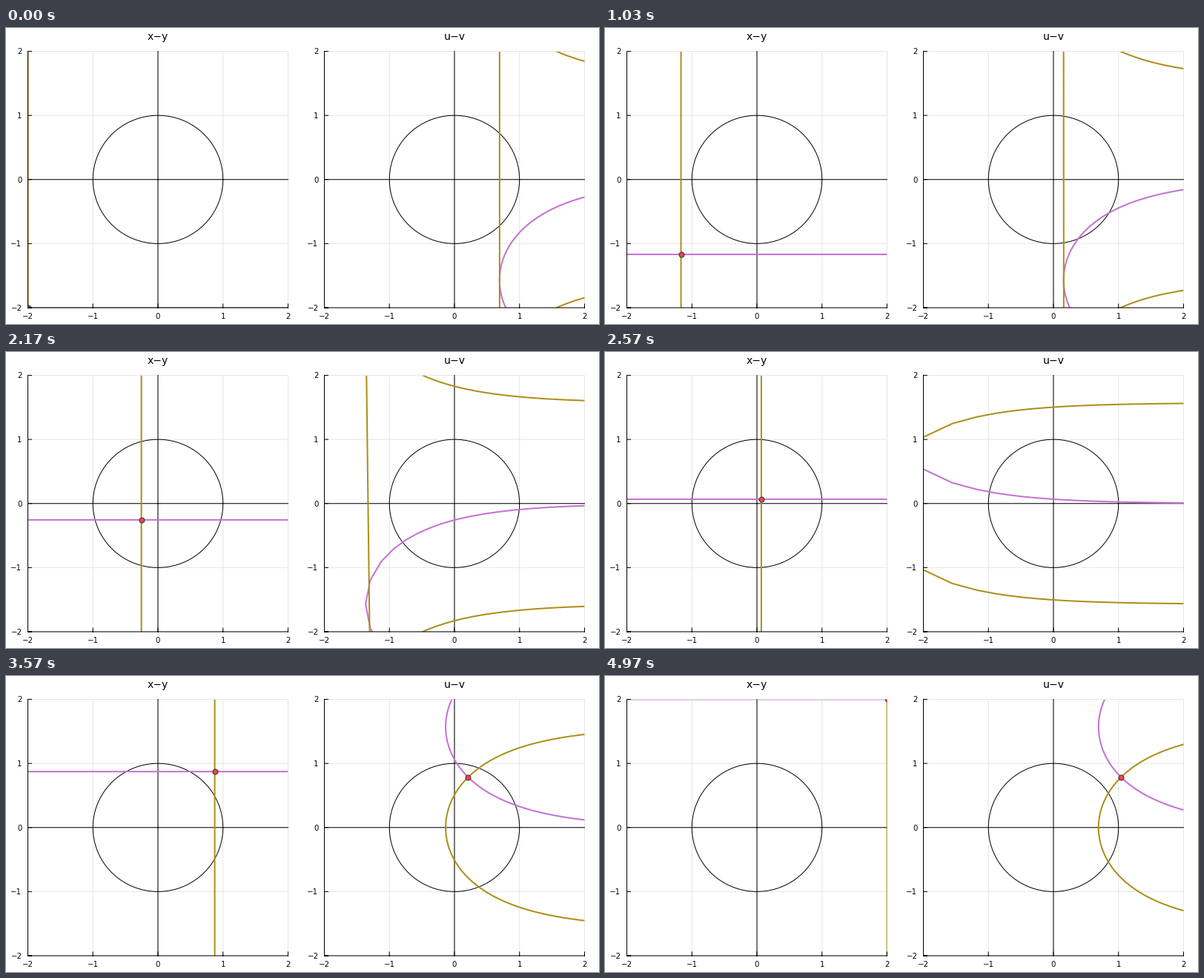
Animation of 800 by 400 pixels, one loop 5010 ms. Source, as a matplotlib script:

```python
import numpy as np
import matplotlib.pyplot as plt
from matplotlib.animation import FuncAnimation
from matplotlib.path import Path

plt.rcParams["font.family"] = "DejaVu Sans"

W, H, DPI = 800, 400, 100
LOOP_MS, TICK_MS = 5010, 10
POSES, FPS = 150, 30
PX = 72 / DPI
PURPLE, GOLD, RED = "#c371d2", "#ac8e18", "#f0444f"

TOP, BOTTOM, SIDE = 31.5, 378, 351
UNIT_X, UNIT_Y = SIDE / 4, (BOTTOM - TOP) / 4

marks = range(-2, 3)
steps = np.arange(-100, 101) / 10
ring = np.exp(1j * np.linspace(0, 2 * np.pi, 181))

fig = plt.figure(figsize=(W / DPI, H / DPI), dpi=DPI, facecolor="white")


def write(text, x, base, size, ha="center"):
    fig.text(x / W, 1 - base / H, text.replace("-", "\u2212"),
             size=size * PX, ha=ha, va="baseline")


def join(*segments):
    """Chain complex segments into one path with gaps."""
    return np.concatenate([[a, b, complex(np.nan, np.nan)] for a, b in segments])


class Panel:
    def __init__(self, left, title):
        ax = self.ax = fig.add_axes([left / W, 1 - BOTTOM / H,
                                     SIDE / W, (BOTTOM - TOP) / H])
        ax.set_axis_off()
        ax.set(xlim=(-2, 2), ylim=(-2, 2))

        self.stroke(join(*[(k - 2j, k + 2j) for k in marks],
                         *[(k * 1j - 2, k * 1j + 2) for k in marks]), "#e5e5e5")
        self.stroke(join((-2j, 2j), (-2, 2)))
        self.stroke(ring)

        self.purple = self.curve(PURPLE)
        self.gold = self.curve(GOLD)
        self.dot = self.curve(RED, marker="o", ms=7 * PX, mec="#333333",
                              mew=PX, ls="none")

        corner = -2 - 2j
        self.stroke(join((corner, corner + 4), (corner, corner + 4j),
                         *[(k - 2j, k - 2j + 5j / UNIT_Y) for k in marks],
                         *[(k * 1j - 2, k * 1j - 2 + 5 / UNIT_X) for k in marks]))
        for k in marks:
            write(str(k), left + (k + 2) * UNIT_X, 392.8, 10.2)
            write(str(k), left - 8, BOTTOM - (k + 2) * UNIT_Y + 3.8, 10.2, "right")
        write(title, left + SIDE / 2, 16, 14)

    def stroke(self, z, color="black", width=1, clip_on=False, **kw):
        return self.ax.plot(z.real, z.imag, color=color, lw=width * PX,
                            snap=False, clip_on=clip_on, **kw)[0]

    def curve(self, color, **kw):
        line = self.stroke(np.array([]), color, 2, clip_on=True, **kw)
        line.set_clip_path(Path.unit_rectangle(), self.ax.transAxes)
        return line

    def show(self, row, column, point):
        for line, z in ((self.purple, row), (self.gold, column),
                        (self.dot, np.array([point]))):
            line.set_data(z.real, z.imag)


plane = Panel(29.5, "x-y")
image = Panel(429.5, "u-v")


def draw(i):
    """Show a horizontal and a vertical line, and their complex logarithms."""
    # Poses run at 30 per second, each start rounded to a tick.
    pose = min(int((i + 0.5) * TICK_MS * FPS / 1000), POSES - 1)
    t = -2 + 4 * pose / (POSES - 1)
    curves = steps + 1j * t, t + 1j * steps, complex(t, t)
    plane.show(*curves)
    image.show(*map(np.log, curves))
    return []


anim = FuncAnimation(fig, draw, frames=LOOP_MS // TICK_MS, interval=TICK_MS,
                     init_func=lambda: draw(0), repeat=True, repeat_delay=0)
plt.show()
```
